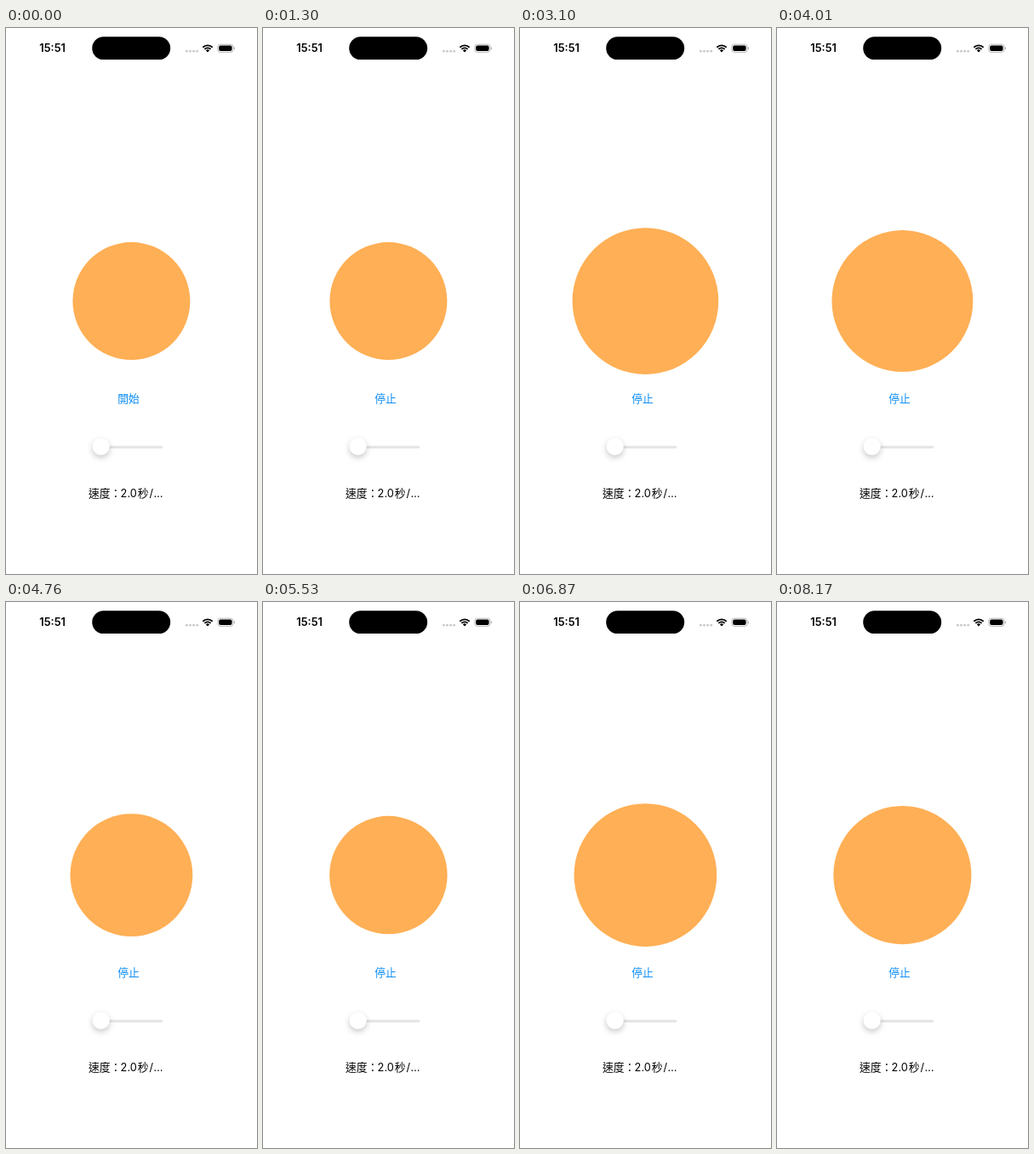
An HTML page with a canvas that plays this animation: 295 px wide and 640 px high, repeating every 8.28 s.

```html
<!DOCTYPE html>
<html lang="zh-Hant">
<head>
<meta charset="utf-8">
<style>
  html, body { margin: 0; width: 100%; height: 100%; overflow: hidden; background: #fff; }
  canvas { display: block; width: 295px; height: 640px; }
</style>
</head>
<body>
<canvas id="stage"></canvas>
<script>
const W = 295, H = 640, LOOP = 8280;
const START = 1190;
const PULSE = { start: 1250, half: 2048, small: 69, large: 86.2 };
const UI_FONT = 'Inter, "Noto Sans CJK TC", sans-serif';
const CJK_FONT = '"Noto Sans CJK TC", "Noto Sans CJK", sans-serif';

// Screen refreshes: first time, last time, number of refreshes
const BURSTS = [
  [1190, 1930, 8], [2040, 2780, 8], [2880, 3200, 4],
  [3400, 4220, 9], [4320, 5090, 8], [5200, 5940, 8],
  [6040, 6760, 8], [6870, 7610, 8], [7730, 8170, 5]
];
const refreshes = [0];
for (const [from, to, count] of BURSTS)
  for (let i = 0; i < count; i++)
    refreshes.push(from + (to - from) * i / (count - 1));

const canvas = document.getElementById('stage');
const ctx = canvas.getContext('2d');
const ratio = window.devicePixelRatio || 1;
canvas.width = Math.round(W * ratio);
canvas.height = Math.round(H * ratio);
ctx.scale(ratio, ratio);

// cubic-bezier(0.42, 0, 0.58, 1)
function easeInOut(p) {
  let lo = 0, hi = 1;
  for (let i = 0; i < 24; i++) {
    const s = (lo + hi) / 2, r = 1 - s;
    const x = 1.26 * r * r * s + 1.74 * r * s * s + s * s * s;
    if (x < p) lo = s; else hi = s;
  }
  return lo * lo * (3 - 2 * lo);
}

function radiusAt(t) {
  const phase = Math.max(0, (t - PULSE.start) / PULSE.half) % 2;
  const p = phase < 1 ? phase : 2 - phase;
  return PULSE.small + (PULSE.large - PULSE.small) * easeInOut(p);
}

function disc(x, y, r, color) {
  ctx.fillStyle = color;
  ctx.beginPath();
  ctx.arc(x, y, r, 0, Math.PI * 2);
  ctx.fill();
}

function pill(x, y, w, h, r, color) {
  ctx.fillStyle = color;
  ctx.beginPath();
  ctx.roundRect(x, y, w, h, r);
  ctx.fill();
}

function label(text, x, y, color, font, align = 'left', weight = 400) {
  ctx.font = `${weight} 12.75px ${font}`;
  ctx.textAlign = align;
  ctx.fillStyle = color;
  ctx.fillText(text, x, y);
}

function drawWifi(x, y) {
  const from = -Math.PI * 0.75, to = -Math.PI * 0.25;
  ctx.strokeStyle = '#000';
  ctx.lineWidth = 1.8;
  for (const r of [8, 5.1]) {
    ctx.beginPath();
    ctx.arc(x, y, r, from, to);
    ctx.stroke();
  }
  ctx.fillStyle = '#000';
  ctx.beginPath();
  ctx.moveTo(x, y);
  ctx.arc(x, y, 3, from, to);
  ctx.fill();
}

function drawBattery() {
  ctx.strokeStyle = '#a6a6a6';
  ctx.lineWidth = 0.8;
  ctx.beginPath();
  ctx.roundRect(248.8, 19.2, 18.2, 9.2, 3);
  ctx.stroke();
  pill(250.2, 20.6, 15.4, 6.4, 1.9, '#000');
  pill(267.8, 22.3, 1, 3, 0.5, '#a6a6a6');
}

function drawStatusBar() {
  label('15:51', 54.6, 28.4, '#000', UI_FONT, 'center', 600);
  pill(101.2, 10.3, 92, 26.8, 13.4, '#000');
  for (let i = 0; i < 4; i++) disc(212.4 + i * 4.1, 27.2, 1.4, '#c8c8c8');
  drawWifi(237, 28.4);
  drawBattery();
}

function drawSlider() {
  pill(101.5, 489.8, 82.7, 3, 1.5, '#e4e4e5');
  ctx.save();
  ctx.shadowColor = 'rgba(0, 0, 0, 0.22)';
  ctx.shadowBlur = 7 * ratio;
  ctx.shadowOffsetY = 3 * ratio;
  disc(111.6, 490.6, 10.2, '#fff');
  ctx.restore();
}

function drawSpeed() {
  const y = 550;
  label('速度：', 96.9, y, '#000', CJK_FONT);
  label('2.0', 134.6, y, '#000', UI_FONT);
  label('秒', 154.7, y, '#000', CJK_FONT);
  label('/', 168.4, y, '#000', UI_FONT);
  label('…', 173.6, y, '#000', UI_FONT);
}

function draw(t) {
  ctx.fillStyle = '#fff';
  ctx.fillRect(0, 0, W, H);
  drawStatusBar();
  disc(147.4, 320.1, radiusAt(t), '#ffaf55');
  label(t < START ? '開始' : '停止', 144, 438.8, '#0a8cf5', CJK_FONT, 'center');
  drawSlider();
  drawSpeed();
}

const origin = performance.now();
function tick() {
  const t = (performance.now() - origin) % LOOP;
  draw(refreshes.findLast(r => r <= t) ?? 0);
  requestAnimationFrame(tick);
}
tick();
</script>
</body>
</html>
```
